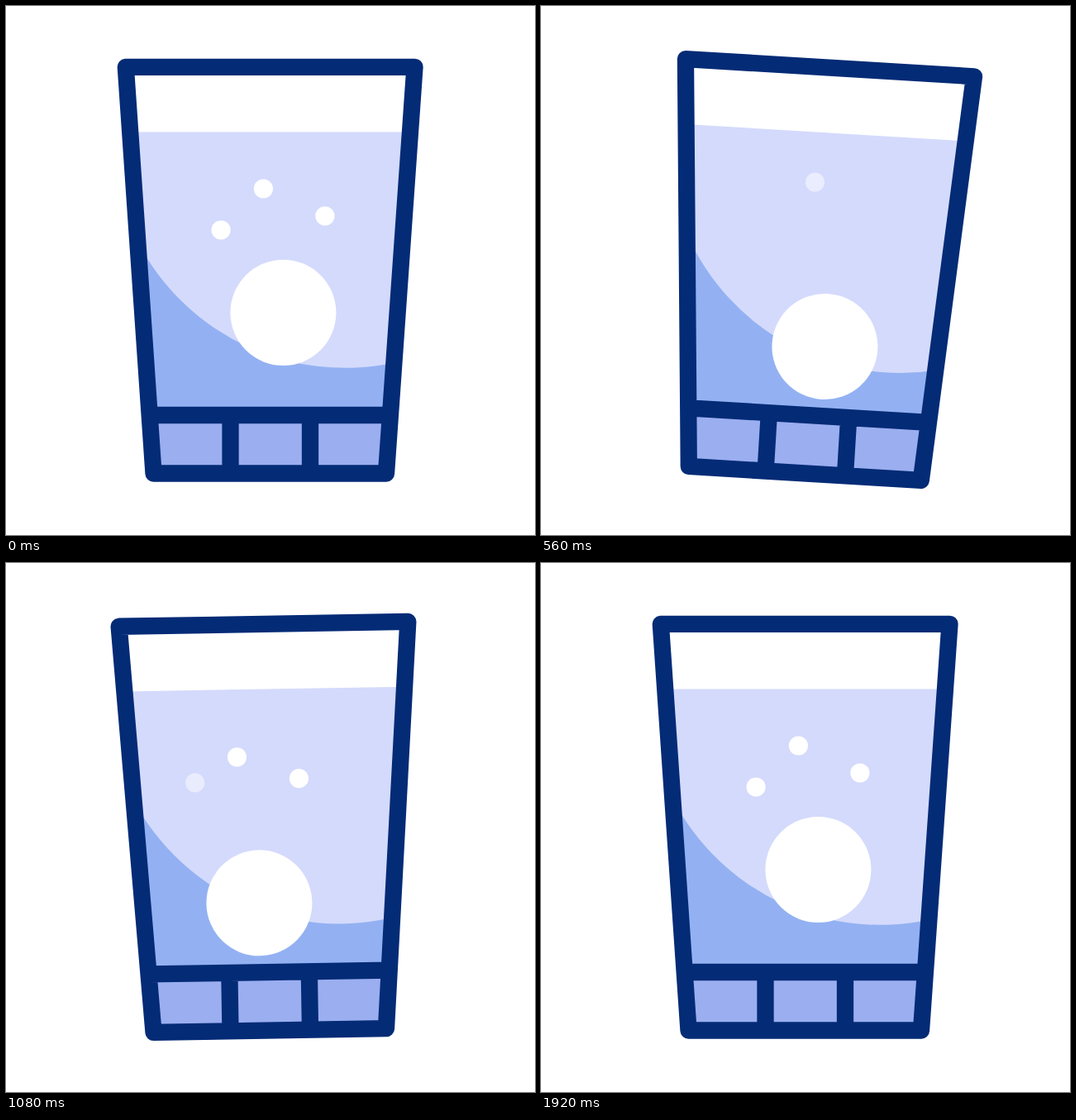
An HTML page that plays this animation: 640 by 640 pixels, repeating every 2 s.

```html
<!DOCTYPE html>
<html lang="en">
<head>
<meta charset="utf-8">
<title>Fizzing glass</title>
<style>
  html, body { margin: 0; width: 100%; height: 100%; overflow: hidden; background: #fff; }
  svg { display: block; width: 100%; height: 100%; }
</style>
</head>
<body>
<svg viewBox="0 0 640 640">
  <g id="glass">
    <path fill="#d4dafc" d="M150 152.500H489L465 495H174Z"/>
    <path fill="#93b1f2" d="M160 286.500A282 282 0 0 0 469.500 431.500L465 495H174Z"/>
    <path fill="#9aaef0" d="M174 495H465L460 566H178.500Z"/>
    <g id="tablet" fill="#fff"><circle r="64"/></g>
    <path fill="none" stroke="#042b76" stroke-width="20.300" stroke-linejoin="round"
      d="M144.800 73.800H494.500L460 565.500H178.500ZM174 495H465M271.500 495V565M368 495V565"/>
  </g>
</svg>
<script>
const LOOP = 2000, STEP = 40, FADE = 120, RISE = 49;
const glass = document.getElementById('glass');
const tablet = document.getElementById('tablet');

const clamp = v => Math.max(0, Math.min(1, v));

// Eased progress from 0 to 1 between two times.
function ease(t, from, to) {
  const p = clamp((t - from) / (to - from));
  return p * p * (3 - 2 * p);
}

// Eases up between a and b, and back down between c and d.
const pulse = (t, a, b, c, d) => ease(t, a, b) - ease(t, c, d);

// Resting place relative to the tablet, rise time, and depth of the last start.
const bubbles = [
  { x: -75.3, y: -100, span: 400, depth: 40 },
  { x: 50.5, y: -117, span: 550, depth: 36 },
  { x: -24, y: -150, span: 620, depth: 52 }
];

const dots = bubbles.flatMap(() => [0, 1].map(() => {
  const dot = document.createElementNS('http://www.w3.org/2000/svg', 'circle');
  dot.setAttribute('r', 11.6);
  return tablet.appendChild(dot);
}));

function place(dot, x, y, opacity) {
  dot.setAttribute('cx', x);
  dot.setAttribute('cy', y);
  dot.setAttribute('opacity', opacity);
}

function drawBubbles(t) {
  bubbles.forEach(({ x, y, span, depth }, i) => {
    const lag = 10 * i;

    // Two rounds leave the resting place and fade away; the first is already there.
    const second = t >= 690;
    const start = second ? 690 + lag : 0;
    const end = start + span * (second ? 1.12 : 1);
    const fadeIn = second ? clamp((t - start) / FADE) : 1;
    place(dots[2 * i], x, y - RISE * ease(t, start, end), fadeIn * clamp((end - t) / FADE));

    // The last round rises into the resting place and stays.
    const last = 1200 + lag;
    const left = 1 - ease(t, last, last + 1.05 * span);
    place(dots[2 * i + 1], x, y + depth * left, clamp((t - last) / FADE));
  });
}

function draw(now) {
  const t = Math.min(Math.floor(now % LOOP / STEP) * STEP, 1920);
  const right = pulse(t, 0, 485, 510, 730);
  const left = pulse(t, 730, 960, 960, 1200);
  const roll = pulse(t, 500, 960, 960, 1640);
  const sink = pulse(t, 240, 600, 1240, 1600);
  glass.setAttribute('transform', `rotate(${4 * right - 1.9 * left} 320 566)`);
  tablet.setAttribute('transform',
    `translate(${335.4 - 28.8 * roll} ${371 + 41.3 * sink - 2.3 * left})`);
  drawBubbles(t);
}

let origin;
function tick(now) {
  origin ??= now;
  draw(now - origin);
  requestAnimationFrame(tick);
}
draw(0);
requestAnimationFrame(tick);
</script>
</body>
</html>
```
